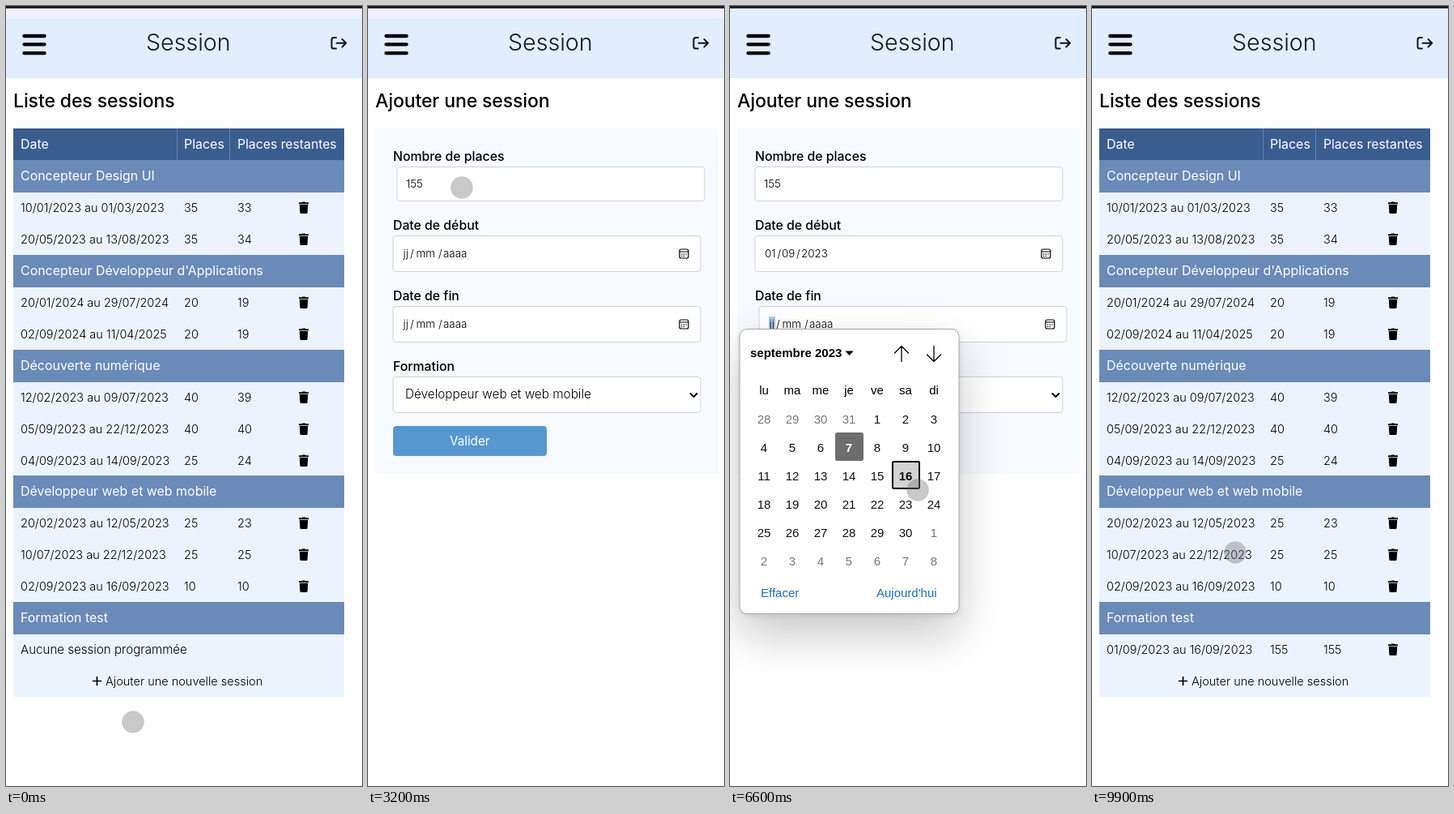
Animation, 440 px wide and 962 px high, one loop 10000 ms. Source, as an HTML page:

```html
<!DOCTYPE html>
<html lang="fr">
<head>
<meta charset="utf-8">
<title>Session</title>
<style>
html, body { margin: 0; width: 100%; height: 100%; overflow: hidden; background: #fff; }
svg { display: block; width: 440px; height: 962px; }
text { font-family: Poppins, Inter, "Open Sans", sans-serif; white-space: pre; }
.brand { font-size: 28.6px; font-weight: 350; fill: #111820; }
.title { font-size: 23px; font-weight: 500; letter-spacing: -.1px; }
.head { font-size: 15.95px; fill: #fff; }
.row { font-size: 14.5px; font-weight: 350; }
.label { font-size: 15.8px; font-weight: 500; }
.val { font-size: 13.4px; font-weight: 350; }
.pick { font-size: 15.3px; font-weight: 350; }
.opt { font-size: 17.9px; font-weight: 400; }
.btn { font-size: 15.2px; fill: #fff; }
.cal text { font: 15px "Liberation Sans", Arial, sans-serif; }
.cal .b { font-weight: 700; }
.cal .mid { text-anchor: middle; }
.pop { filter: drop-shadow(0 26px 29px rgba(0,0,0,.2)) drop-shadow(0 2px 3px rgba(0,0,0,.1)); }
.line { fill: none; stroke: #000; stroke-linecap: round; stroke-linejoin: round; }
</style>
</head>
<body>
<svg id="stage" viewBox="0 0 440 962"></svg>
<script>
const LOOP = 10000;
const text = (x, y, cls, s, extra = '') => `<text x="${x}" y="${y}" class="${cls}" ${extra}>${s}</text>`;
const rect = (x, y, w, h, fill, extra = '') => `<rect x="${x}" y="${y}" width="${w}" height="${h}" fill="${fill}" ${extra}/>`;
const line = (d, w, extra = '') => `<path class="line" d="${d}" stroke-width="${w}" ${extra}/>`;
const group = (id, body, extra = '') => `<g id="${id}" ${extra}>${body}</g>`;

const courses = {
  web: 'Développeur web et web mobile',
  app: "Concepteur Développeur d'Applications",
  ui: 'Concepteur Design UI',
  num: 'Découverte numérique',
  test: 'Formation test'
};
const sessions = [
  [courses.ui], ['10/01/2023 au 01/03/2023', 35, 33], ['20/05/2023 au 13/08/2023', 35, 34],
  [courses.app], ['20/01/2024 au 29/07/2024', 20, 19], ['02/09/2024 au 11/04/2025', 20, 19],
  [courses.num], ['12/02/2023 au 09/07/2023', 40, 39], ['05/09/2023 au 22/12/2023', 40, 40],
  ['04/09/2023 au 14/09/2023', 25, 24],
  [courses.web], ['20/02/2023 au 12/05/2023', 25, 23], ['10/07/2023 au 22/12/2023', 25, 25],
  ['02/09/2023 au 16/09/2023', 10, 10],
  [courses.test]
];
const added = ['01/09/2023 au 16/09/2023', 155, 155];

function header() {
  return rect(0, 0, 440, 89, '#e2edfe') +
    group('band', rect(0, 3, 440, 13, '#f0f0fe')) +
    rect(0, 0, 440, 3, '#20202a') +
    line('M22.4 37H47.6M22.4 47.3H47.6M22.4 58.2H47.6', 4.3) +
    text(173, 55, 'brand', 'Session') +
    line('M408 39H405Q402.5 39 402.5 41.5V50Q402.5 52.5 405 52.5H408M408.5 45.8H420M415.5 41L420.2 45.8L415.5 50.5', 2, 'style="stroke:#10151c"');
}

function trash(x, y) {
  return `<path transform="translate(${x} ${y})" d="M-6-6.8H-2.3L-1.6-7.6H1.6L2.3-6.8H6V-4.8H-6ZM-5.2-4H5.2L4.6 5.8Q4.5 7 3.2 7H-3.2Q-4.5 7-4.6 5.8Z"/>`;
}

function table(done) {
  const edge = i => Math.round(151 + 38.95 * i);
  let out = text(9, 124.5, 'title', 'Liste des sessions') +
    rect(9, 151, 409, edge(18) - 151, '#edf3fd') + rect(9, 151, 409, edge(1) - 151, '#3a5d90') +
    rect(211, 151, 1, 39, '#5f82b2') + rect(276, 151, 1, 39, '#5f82b2') +
    text(18, 176, 'head', 'Date') + text(220, 176, 'head', 'Places') +
    text(286, 176, 'head', 'Places restantes', 'style="font-size:15.75px"');
  const rows = [...sessions, done ? added : null];
  rows.forEach((r, i) => {
    const y = edge(i + 1), base = y + 24.8;
    if (!r) {
      out += text(18, base, 'row', 'Aucune session programmée', 'style="font-size:15.1px"');
    } else if (r.length === 1) {
      out += rect(9, y, 409, edge(i + 2) - y + 1, '#6a8ab8') + text(18, base, 'head', r[0]);
    } else {
      out += text(18, base, 'row', r[0]) + text(220, base, 'row', r[1]) +
        text(286, base, 'row', r[2]) + trash(done ? 372 : 368, y + 20);
    }
  });
  return out + line('M107.5 832.5H117.5M112.5 827.5V837.5', 1.7) +
    text(123, 838, 'row', 'Ajouter une nouvelle session');
}

const box = (y, h) => rect(31, y + .5, 380, h, '#fff', 'rx="3.5" stroke="#cfd3d8"');
const picker = y => line(`M387 ${y}H394Q396 ${y} 396 ${y + 2}V${y + 9}Q396 ${y + 11} 394 ${y + 11}H387Q385 ${y + 11} 385 ${y + 9}V${y + 2}Q385 ${y} 387 ${y}ZM385 ${y + 3}H396`, 1.2) +
  line(`M387.7 ${y + 6}H394M387.7 ${y + 8.5}H392`, 1.4, 'stroke-dasharray=".1 2.6"');

function dateParts(y, parts, xs) {
  return parts.map((p, i) => text(xs[i], y, 'val', p)).join('');
}

function dateField(id, y, day) {
  return group(id, box(y, 44) + rect(43, y + 13, 13, 19, '#abcbf5', `id="${id}Mark"`) +
    group(id + 'Empty', dateParts(y + 27, ['jj', '/', 'mm', '/', 'aaaa'], [43.5, 52, 59.5, 87, 93])) +
    group(id + 'Full', dateParts(y + 27, [day, '/', '09', '/', '2023'], [43, 58.5, 64, 82, 88])) +
    picker(y + 17));
}

function form() {
  return rect(9, 151, 424, 426, '#f6f9fe') +
    text(9, 124.5, 'title', 'Ajouter une session') +
    text(31, 191, 'label', 'Nombre de places') + text(31, 276, 'label', 'Date de début') +
    text(31, 363, 'label', 'Date de fin') + text(31, 450, 'label', 'Formation') +
    group('places', box(198, 42) + text(42, 224, 'val', '', 'id="count"')) +
    dateField('start', 283, '01') + dateField('end', 370, '16') +
    box(457, 44) + text(46, 484, 'pick', '', 'id="course"') +
    line('M398.5 478L402.5 482L406.5 478', 2) +
    rect(31, 518, 190, 37, '#5797cf', 'rx="4"') + text(101, 541.5, 'btn', 'Valider');
}

function calendar() {
  let out = rect(0, -.5, 271, 351, '#fff', 'rx="9" stroke="#a9a9a9" class="pop"') +
    text(13, 34, 'b', 'septembre 2023') + '<path d="M130.5 26.5H140.5L135.5 32Z"/>' +
    line('M200 39.5V20.5M191.5 29L200 20.5L208.5 29M240 20.5V39.5M231.5 31L240 39.5L248.5 31', 1.3);
  ['lu', 'ma', 'me', 'je', 've', 'sa', 'di'].forEach((d, i) => out += text(30 + 35 * i, 80, 'mid', d));
  out += rect(119, 128, 33, 33, '#6e6e6e', 'id="today" rx="1.5" stroke-width="2"') +
    rect(189, 163, 33, 33, '#d3d3d3', 'id="chosen" rx="1.5" stroke="#000" stroke-width="2"');
  for (let i = 0; i < 42; i++) {
    const n = i - 3, dim = n < 1 || n > 30;
    const day = n < 1 ? n + 31 : n > 30 ? n - 30 : n;
    const fill = n === 7 ? '#fff' : dim ? '#767676' : '#111';
    out += text(30 + 35 * (i % 7), 116 + 35 * Math.floor(i / 7), n === 7 ? 'mid b' : 'mid', day,
      `fill="${fill}" ${n === 16 ? 'id="d16"' : ''}`);
  }
  return out + text(26, 330, '', 'Effacer', 'fill="#1a6fc0"') + text(169, 330, '', "Aujourd'hui", 'fill="#1a6fc0"');
}

function menu() {
  return rect(28, 503.5, 440, 201.5, '#fff', 'rx="8" stroke="#a9a9a9" class="pop"') +
    '<path id="hotTop" fill="#747474" d="M28 544V511Q28 503.5 36 503.5H440V544Z"/>' +
    '<path id="hotEnd" fill="#747474" d="M28 664H440V705H36Q28 705 28 697Z"/>' +
    ['web', 'app', 'ui', 'num', 'test'].map((k, i) =>
      text(46, 530 + 40 * i, 'opt', courses[k], `id="opt${i}"`)).join('');
}

document.getElementById('stage').innerHTML = rect(0, 0, 440, 962, '#fff') + header() +
  group('before', table(false)) + group('after', table(true)) + group('form', form()) +
  group('cal', calendar(), 'class="cal"') + group('menu', menu()) +
  group('dot', '<circle r="13.6" fill="#777" fill-opacity=".4" stroke="#777" stroke-opacity=".1"/>') +
  group('arrow', '<path d="M0 0V16.5L3.8 13L6.2 18.4L8.6 17.3L6.2 12H11.3Z" fill="#fff" stroke="#222" stroke-width=".9"/>');

const el = {};
document.querySelectorAll('[id]').forEach(n => el[n.id] = n);
const show = (id, on) => el[id].style.display = on ? '' : 'none';
const move = (id, x, y) => el[id].setAttribute('transform', `translate(${x} ${y})`);

// time, x, y
const path = [
  [0, 157, 883], [600, 190, 846], [1000, 212, 834], [1300, 206, 820], [1700, 99, 297],
  [2100, 112, 222], [3300, 116, 224], [3900, 389, 306], [4050, 388, 308], [4200, 335, 329],
  [4900, 192, 438], [5150, 192, 438], [5600, 387, 396], [5900, 389, 394], [6300, 226, 588],
  [6600, 232, 597], [6800, 234, 594], [7200, 250, 482], [7450, 250, 482], [8000, 116, 670],
  [8200, 112, 682], [8450, 112, 682], [8800, 128, 538], [9200, 130, 540], [9900, 177, 674], [10000, 177, 674]
];
const smooth = u => u * u * (3 - 2 * u);
function pointer(t) {
  const i = path.findIndex((p, k) => k && t <= p[0]);
  const a = path[i - 1], b = path[i], u = smooth((t - a[0]) / (b[0] - a[0]));
  return [a[1] + (b[1] - a[1]) * u, a[2] + (b[2] - a[2]) * u];
}
const ramp = (t, from) => smooth(Math.min(1, Math.max(0, (t - from) / 200)));
const nudge = (t, on, off) => 5 * (ramp(t, on) - ramp(t, off));
const within = (t, a, b) => t >= a && t < b;

function draw(t) {
  const [x, y] = pointer(t);
  const first = within(t, 4100, 5200), second = within(t, 5900, 6700), open = within(t, 7400, 8400);
  const started = t >= 5200, ended = t >= 6700, hot = t >= 8100;

  show('band', t < 4000);
  show('before', t < 1300);
  show('form', within(t, 1300, 9300));
  show('after', t >= 9300);

  move('places', nudge(t, 2150, 4075), 0);
  move('start', nudge(t, 4075, 5800), 0);
  move('end', nudge(t, 5800, 7300), 0);
  el.count.textContent = '155'.slice(0, t < 2600 ? 0 : t < 2900 ? 1 : t < 3100 ? 2 : 3);
  show('startMark', within(t, 4100, 5800));
  show('endMark', within(t, 5850, 7300));
  el.startMark.setAttribute('width', started ? 14 : 8);
  el.endMark.setAttribute('width', ended ? 14 : 8);
  show('startEmpty', !started);
  show('startFull', started);
  show('endEmpty', !ended);
  show('endFull', ended);
  el.course.textContent = t < 8400 ? courses.web : courses.test;

  show('cal', first || second);
  move('cal', first ? 22 : 12, first ? 326 : 399);
  const picked = within(t, 6500, 6700);
  show('chosen', picked);
  el.today.setAttribute('stroke', picked ? '#6e6e6e' : '#000');
  el.d16.setAttribute('class', picked ? 'mid b' : 'mid');

  show('menu', open);
  show('hotTop', !hot);
  show('hotEnd', hot);
  el.opt0.style.fill = hot ? '#000' : '#fff';
  el.opt4.style.fill = hot ? '#fff' : '#000';

  show('dot', !open);
  show('arrow', open);
  move('dot', x, y);
  move('arrow', x, y);
}

const began = performance.now();
function tick() {
  const t = (performance.now() - began) % LOOP;
  draw(Math.floor(t / 100) * 100);
  requestAnimationFrame(tick);
}
tick();
</script>
</body>
</html>
```
